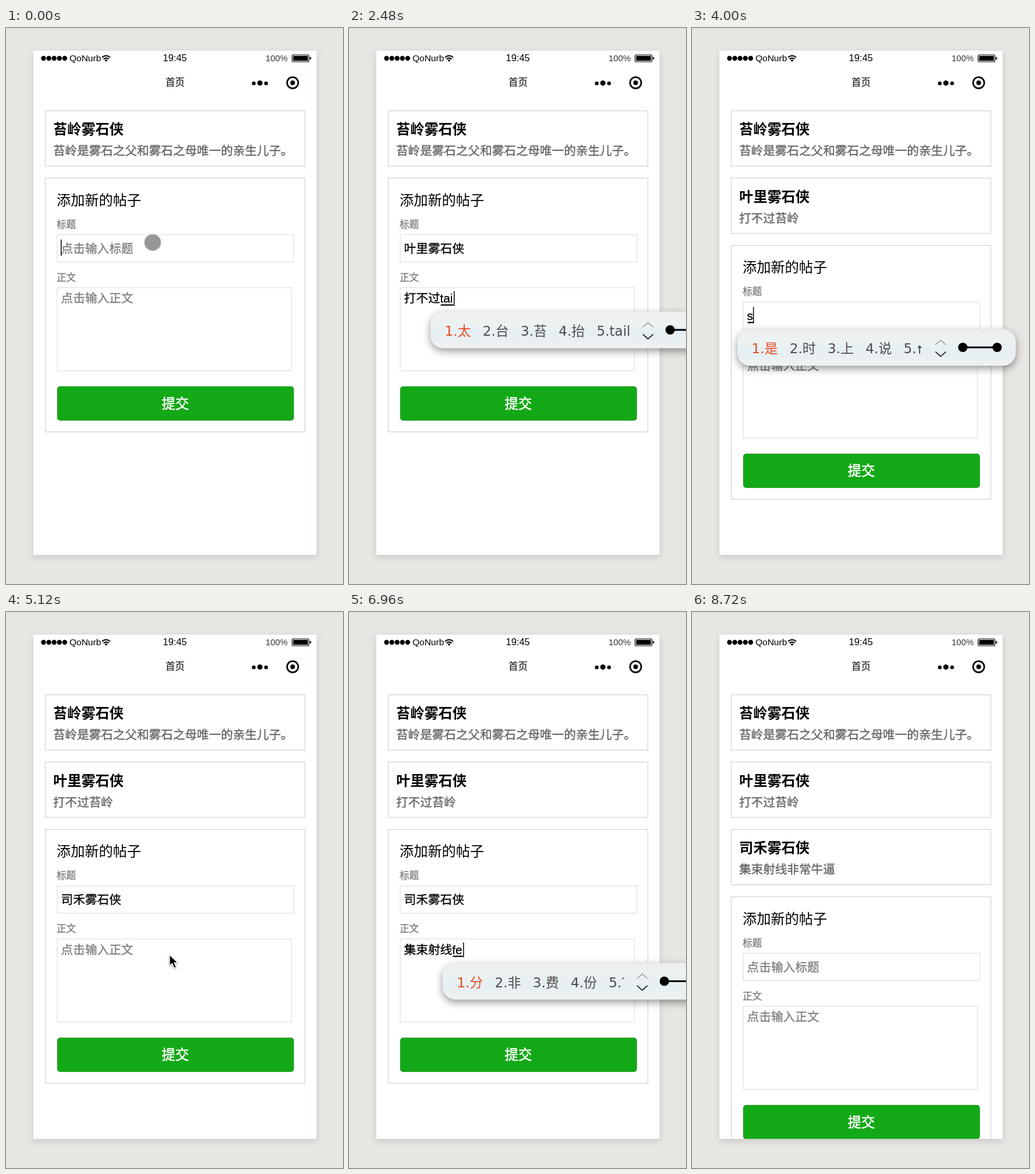
An HTML page for the animation above (9720 ms loop, 579 by 954 pixels).

```html
<!DOCTYPE html>
<html lang="zh-CN">
<head>
<meta charset="utf-8">
<title>添加新的帖子</title>
<style>
  html, body { margin: 0; width: 100%; height: 100%; overflow: hidden; background: #e7e6e2; }
  svg { display: block; width: 579px; height: 954px; }
  text { font-family: "Liberation Sans", "Noto Sans CJK SC", "Noto Sans CJK", sans-serif; }
  .phone { filter: drop-shadow(0 4px 6px rgba(0, 0, 0, .13)); }
  .card { fill: #fff; stroke: #d9d9d9; stroke-width: 1.5; }
  .field { fill: #fff; stroke: #e2e2e2; stroke-width: 1.3; }
  .name { font-size: 24.2px; font-weight: 700; }
  .note { font-size: 20.6px; fill: #626262; stroke: #626262; stroke-width: .35; }
  .label { font-size: 16.6px; fill: #7a7a7a; stroke: #7a7a7a; stroke-width: .3; }
  .value { font-size: 20.7px; stroke: #000; stroke-width: .3; }
  .value.empty { fill: #7c7c7c; stroke: #7c7c7c; }
  .send { font-size: 23.4px; fill: #fff; stroke: #fff; stroke-width: .6; }
  .ime text { font-family: "DejaVu Sans", "Noto Sans CJK SC", "Noto Sans CJK", sans-serif; font-size: 23px; fill: #4c4c4c; }
  .ime text:first-child { fill: #e8491f; }
  .ime .arrow { font-family: "Liberation Sans", sans-serif; stroke: #4c4c4c; stroke-width: .9; }
  .bar { fill: url(#glass); filter: drop-shadow(0 5px 7px rgba(0, 0, 0, .4)); }
  .line { fill: none; stroke: #000; }
</style>
</head>
<body>
<svg viewBox="0 0 579 954">
  <defs>
    <linearGradient id="glass" x2="0" y2="1">
      <stop offset="0" stop-color="#eceeed"/>
      <stop offset=".3" stop-color="#eef2f2"/>
      <stop offset=".6" stop-color="#e5eff3"/>
      <stop offset="1" stop-color="#eff2f1"/>
    </linearGradient>
    <clipPath id="screen"><rect x="47" y="39" width="486.5" height="865"/></clipPath>
  </defs>

  <rect class="phone" x="47" y="39" width="486.5" height="865" fill="#fff"/>

  <g id="status">
    <path d="M64.5 52h36.4" stroke="#000" stroke-width="8.4" stroke-linecap="round" stroke-dasharray="0 9.08"/>
    <text x="109" y="57" font-size="15.5">QoNurb</text>
    <path class="line" d="M165 50.5q7-6 14 0M167.6 53.4q4.4-3.6 8.8 0" stroke-width="2"/>
    <path d="M169.5 55.2q2.5-1.8 5 0l-2.5 2.8z"/>
    <text x="269.5" y="57" font-size="16.5">19:45</text>
    <text x="446" y="57" font-size="14.8" fill="#333">100%</text>
    <rect class="line" x="491.5" y="46" width="29" height="12" rx="2.5" stroke-width="1.2"/>
    <rect x="493.3" y="47.8" width="25.4" height="8.4" rx="1"/>
    <path d="M522 49.8q2.500 0 2.500 2.200t-2.500 2.200z"/>
    <text x="274" y="98.600" font-size="16.5">首页</text>
    <circle cx="425.7" cy="95" r="3.2"/>
    <circle cx="436.2" cy="94.4" r="4.5"/>
    <circle cx="446.8" cy="95" r="3.2"/>
    <circle class="line" cx="492.5" cy="94" r="9.6" stroke-width="2.7"/>
    <circle cx="492.5" cy="94" r="4"/>
  </g>

  <g clip-path="url(#screen)">
    <g id="posts"></g>
    <g id="form">
      <rect class="card" x="67.5" y="257.5" width="446" height="435.5"/>
      <text x="87" y="303.5" font-size="24.2">添加新的帖子</text>
      <text class="label" x="87" y="342.600">标题</text>
      <rect class="field" x="88" y="354.5" width="406.5" height="47"/>
      <text class="label" x="87" y="433.600">正文</text>
      <rect class="field" x="88" y="445.5" width="402.5" height="142.5"/>
      <text class="value" x="94.5" y="385.5"></text>
      <text class="value" x="94.5" y="471"></text>
      <rect id="under" height="2.6" fill="#222"/>
      <rect id="caret" width="1.5"/>
      <rect id="button" x="88" y="615" width="406.5" height="58.5" rx="5" stroke="rgba(0,0,0,.2)"/>
      <text class="send" x="267.5" y="652.600">提交</text>
    </g>
  </g>

  <g id="ime" class="ime">
    <rect id="bar" class="bar" height="63" rx="22"/>
    <g id="words"></g>
    <g id="tools" class="line">
      <path d="M0 27l9-8 9 8" stroke="#999" stroke-width="1.5"/>
      <path d="M0 39l9 8 9-8" stroke-width="1.6"/>
      <path d="M47 31.5h59" stroke-width="3"/>
      <path d="M47 31.5h0M106 31.5h0" stroke-width="16" stroke-linecap="round"/>
    </g>
  </g>

  <circle id="touch" r="14" fill="#979797" stroke="#b4b4b4" stroke-width="1.2"/>
  <path id="pointer" d="M0 0v19l4.4-4 3.7 8 3.5-1.6-3.6-7.6h6z" stroke="#fff" stroke-width="1.3"
        style="filter:drop-shadow(0 1px 1.5px rgba(0,0,0,.4))"/>
</svg>

<script>
const LOOP = 9720, STEP = 80, ROW = 115.5;
const $ = id => document.getElementById(id);
const TITLE = 0, BODY = 1, BLUR = 2, CLEAR = 3;
const SUBMIT = [3200, 8400];

const posts = [
  ['苔岭雾石侠', '苔岭是雾石之父和雾石之母唯一的亲生儿子。'],
  ['叶里雾石侠', '打不过苔岭'],
  ['司禾雾石侠', '集束射线非常牛逼']
];

// time, field, committed text, pinyin, letters shown at once, candidates
const steps = [
  [0, TITLE, ''],
  [240, TITLE, '', 'yeliwushixia', 1, '一 有 要 也 以'],
  [320, TITLE, '', 'yeliwushixia', 2, '也 夜 叶 业 野'],
  [480, TITLE, '', 'yeliwushixia', 4, '夜里 也 夜 叶 业'],
  [800, TITLE, '', 'yeliwushixia', 8, '夜里无事 夜里 也 夜 叶'],
  [1040, TITLE, '', 'yeliwushixia', 11, '叶里雾石侠 夜里 也 夜 叶'],
  [1200, TITLE, posts[1][0]],
  [1440, BLUR],
  [1680, BODY, ''],
  [1760, BODY, '', 'dabuguo', 1, '的 到 都 大 对'],
  [1920, BODY, '', 'dabuguo', 3, '大部 打不 大 打 达'],
  [2080, BODY, '', 'dabuguo', 5, '打不过 大不过 大 打 达'],
  [2320, BODY, '打不过', 'tailing', 1, '他 她 天 听 太'],
  [2400, BODY, '打不过', 'tailing', 2, '他 她 它 塔 踏'],
  [2480, BODY, '打不过', 'tailing', 3, '太 台 苔 抬 tail'],
  [2640, BODY, '打不过', 'tailing', 5, '苔岭 台灵 太 台 苔'],
  [2880, BODY, posts[1][1]],
  [3040, BLUR],
  [3200, CLEAR],
  [3680, TITLE, ''],
  [4000, TITLE, '', 'sihewushixia', 1, '是 时 上 说 ↑'],
  [4080, TITLE, '', 'sihewushixia', 2, '四 死 司 思 丝'],
  [4240, TITLE, '', 'sihewushixia', 4, '四盒 四 死 司 思'],
  [4640, TITLE, '', 'sihewushixia', 9, '司禾雾石侠 四盒 四 死 司'],
  [4960, TITLE, posts[2][0]],
  [5040, BLUR],
  [5360, BODY, ''],
  [5600, BODY, '', 'jishushexian', 1, '就 将 进 叫 家'],
  [5680, BODY, '', 'jishushexian', 2, '及 几 级 集 记'],
  [5920, BODY, '', 'jishushexian', 5, '技术 集束 级数 基数 几'],
  [6240, BODY, '', 'jishushexian', 9, '集束射线 技术 集束 级数 几'],
  [6560, BODY, '集束射线'],
  [6880, BODY, '集束射线', 'feichang', 1, '分 发 放 费 非'],
  [6960, BODY, '集束射线', 'feichang', 2, '分 非 费 份 ′'],
  [7040, BODY, '集束射线', 'feichang', 3, '非 费 飞 肥 废'],
  [7200, BODY, '集束射线', 'feichang', 5, '非常 肥肠 非 费 飞'],
  [7520, BODY, '集束射线非常', 'niubi', 1, '你 年 那 呢 女'],
  [7680, BODY, '集束射线非常', 'niubi', 3, '牛 扭 纽 钮 妞'],
  [7840, BODY, '集束射线非常', 'niubi', 5, '牛逼 牛 扭 纽 钮'],
  [7920, BODY, posts[2][1]],
  [8160, BLUR],
  [8400, CLEAR]
];

// each run: points of time, x, y
const moves = [
  [[0, 252, 368], [80, 254, 359], [240, 254, 359]],
  [[1280, 252, 362], [1360, 254, 368], [1600, 275, 450], [1680, 282, 476], [1760, 282, 476]],
  [[2880, 282, 476], [3040, 289, 640], [3280, 290, 645], [3600, 200, 490], [4000, 200, 490]],
  [[4960, 232, 500], [5120, 281, 588], [5280, 286, 602], [5600, 286, 602]],
  [[7920, 286, 602], [8240, 290, 758], [8480, 290, 760], [8720, 300, 985]]
];

const set = (el, attrs) => { for (const k in attrs) el.setAttribute(k, attrs[k]); };
const show = (el, on) => { el.style.display = on ? '' : 'none'; };

$('posts').innerHTML = posts.map(([name, note], i) => `<g transform="translate(0 ${i * ROW})">
  <rect class="card" x="67.5" y="142" width="446" height="95"/>
  <text class="name" x="81" y="182">${name}</text>
  <text class="note" x="81" y="218.4">${note}</text></g>`).join('');
const cards = [...$('posts').children];
const inputs = [...document.querySelectorAll('.value')];
const hints = ['点击输入标题', '点击输入正文'];

function cursorAt(t) {
  const run = moves.find(m => t >= m[0][0] && t < m[m.length - 1][0]);
  if (!run) return null;
  const i = run.findIndex(p => p[0] > t);
  const [a, b] = [run[i - 1], run[i]];
  const k = (t - a[0]) / (b[0] - a[0]);
  return [a[1] + (b[1] - a[1]) * k, a[2] + (b[2] - a[2]) * k];
}

function drawIme(x, y, list) {
  $('words').innerHTML = list.map((w, i) =>
    `<text y="41.5">${i + 1}.<tspan${w === '↑' ? ' class="arrow"' : ''}>${w}</tspan></text>`).join('');
  let end = 24.5;
  for (const word of $('words').children) {
    set(word, { x: end });
    end += word.getComputedTextLength() + 20.3;
  }
  end += 1;
  set($('tools'), { transform: `translate(${end} 0)` });
  set($('bar'), { width: end + 138 });
  set($('ime'), { transform: `translate(${x} ${y})` });
}

function draw(t) {
  const count = 1 + SUBMIT.filter(s => t >= s).length;
  const dy = (count - 1) * ROW;
  cards.forEach((c, i) => show(c, i < count));
  set($('form'), { transform: `translate(0 ${dy})` });
  set($('button'), { fill: SUBMIT.some(s => t >= s - STEP && t < s) ? '#109a13' : '#13a916' });

  const values = ['', ''];
  let now;
  for (const s of steps) {
    if (s[0] > t) break;
    now = s;
    if (s[1] === CLEAR) values.fill('');
    else if (s[1] !== BLUR) values[s[1]] = s[2];
  }
  const [start, field, , pinyin = '', first = 0, words] = now;
  const typed = pinyin.slice(0, first + (t - start) / STEP);
  const focused = field < BLUR;

  inputs.forEach((el, i) => {
    const text = values[i] + (i === field ? typed : '');
    el.textContent = text || hints[i];
    el.classList.toggle('empty', !text);
  });

  show($('caret'), focused);
  show($('under'), typed);
  show($('ime'), typed);
  if (focused) {
    const el = inputs[field], base = +el.getAttribute('y');
    const full = values[field] + typed;
    const left = 94.5 + (values[field] ? el.getSubStringLength(0, values[field].length) : 0);
    const right = full ? 94.5 + el.getComputedTextLength() : 94;
    set($('caret'), field === TITLE
      ? { x: right, y: base - 22.5, height: 28 }
      : { x: right + 1.5, y: base - 19.5, height: 25.5 });
    if (typed) {
      set($('under'), { x: left + 1, y: base + 3, width: right - left });
      drawIme(left - 16.5, base + dy + 15.5, words.split(' '));
    }
  }

  const at = cursorAt(t), arrow = t >= 4960 && t < 5280;
  show($('touch'), at && !arrow);
  show($('pointer'), at && arrow);
  if (at) set(arrow ? $('pointer') : $('touch'), { transform: `translate(${at})` });
}

let last = -1;
function tick() {
  const t = Math.floor(performance.now() % LOOP / STEP) * STEP;
  if (t !== last) draw(last = t);
  requestAnimationFrame(tick);
}
tick();
</script>
</body>
</html>
```
